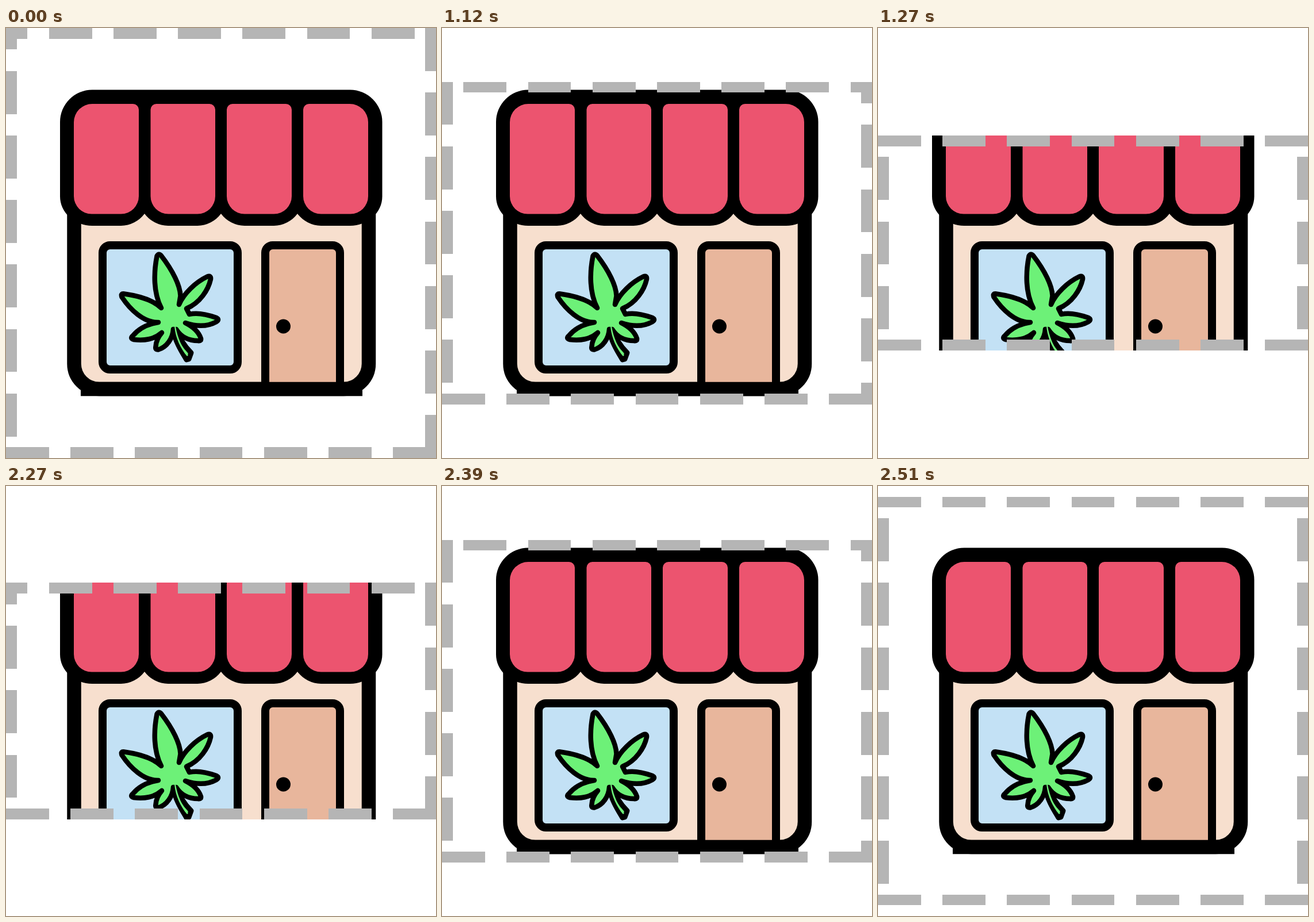
An HTML page that plays this animation: 748x748 px, repeating every 2540 ms.

```html
<!DOCTYPE html>
<html lang="en">
<head>
<meta charset="utf-8">
<title>Shop crop</title>
<style>
  html, body { margin: 0; width: 100%; height: 100%; overflow: hidden; background: #fff; }
  svg { display: block; width: 100vw; height: 100vh; }
</style>
</head>
<body>
<svg viewBox="0 0 748 748">
  <clipPath id="crop"><rect id="window" width="748" height="748"/></clipPath>
  <g clip-path="url(#crop)" stroke="#000">
    <rect x="118.5" y="200" width="512.5" height="428" rx="44" fill="#f7dfce" stroke-width="24.5"/>
    <rect x="168" y="378" width="235" height="216" rx="13" fill="#c3e1f5" stroke-width="14"/>
    <path d="M451 622V391a13 13 0 0 1 13-13H568a13 13 0 0 1 13 13V622" fill="#e8b69c" stroke-width="14"/>
    <path d="M130 628H620" stroke-width="24.5"/>
    <circle cx="482.5" cy="519" r="12.5" stroke="none"/>

    <g fill="#6df178" stroke-width="9" stroke-linejoin="round">
      <path d="M291 524C294 545 305 562 314 577L318 576L322 565C310 553 302 540 297 524Z"/>
      <path stroke-width="8.5" d="M270 487C256 460 257 425 262.500 397Q265.500 391 270 396
        C290 422 303 448 303.500 466L301 481
        C309 462 330 442 350 432.500Q357 430 356 437C352 455 338 478 314 488
        L319 498C335 494 352 499 366 504Q372 507 366 511C350 520 330 519 312 513
        C326 520 335 528 339 540Q340 545 334 544C318 544 304 537 296 524L291 524
        C290 540 280 555 265 559.500Q259 560 260.500 554C261 545 265 537 271 530
        C257 542 241 544 222 542Q215 540 221 535C231 523 246 515 265 512
        C240 513 216 490 201.500 468Q199 461 206 462.500C230 466 255 472 270 487Z"/>
      <path stroke="none" d="M293 519C295 540 304 558 315 571L317 569C306 555 299 541 295 519Z"/>
    </g>

    <path stroke="none" d="M94 163.500A56 56 0 0 1 150 107.500H598.500A56 56 0 0 1 654.500 163.500V293
      A56 51 0 0 1 598.500 344H548A52 52 0 0 1 507 323A52 52 0 0 1 466 344H415
      A52 52 0 0 1 374 323A52 52 0 0 1 333 344H282A52 52 0 0 1 241 323
      A52 52 0 0 1 200 344H150A56 51 0 0 1 94 293Z"/>
    <g id="awning" fill="#ec546f" stroke="none"></g>
  </g>
  <path id="dashes" fill="#b5b5b5"/>
</svg>
<script>
const CELLS = 40, UNIT = 748 / CELLS;
const DASH = 4, PERIOD = 6;
const LOOP = 2540, STEP = 30, CLOSE = 1000, OPEN = 2270, DEEPEST = 10;

const byId = id => document.getElementById(id);
const px = cell => Math.round(cell * UNIT);
const mod = (n, m) => ((n % m) + m) % m;

function panel(left, right, topLeft, topRight) {
  const top = 132, bottom = 323.5, r = 31;
  const arc = (radius, x, y) => `A${radius} ${radius} 0 0 1 ${x} ${y}`;
  return `<path d="M${left} ${top + topLeft}${arc(topLeft, left + topLeft, top)}` +
    `H${right - topRight}${arc(topRight, right, top + topRight)}` +
    `V${bottom - r}${arc(r, right - r, bottom)}H${left + r}${arc(r, left, bottom - r)}Z"/>`;
}

byId('awning').innerHTML = panel(118, 231, 32, 10) + panel(251.5, 364, 10, 10) +
  panel(384, 497, 10, 10) + panel(517, 630, 10, 32);

// Calls add(start, end) for each dash between two cells.
function eachDash(from, to, phase, add) {
  for (let c = from - mod(from - phase, PERIOD); c < to; c += PERIOD) {
    const a = Math.max(c, from), b = Math.min(c + DASH, to);
    if (a < b) add(a, b);
  }
}

function drawCrop(inset) {
  const end = CELLS - inset;
  let path = '';
  const box = (x0, y0, x1, y1) => {
    path += `M${px(x0)} ${px(y0)}H${px(x1)}V${px(y1)}H${px(x0)}Z`;
  };
  const row = (y, phase) => eachDash(0, CELLS, phase, (a, b) => box(a, y, b, y + 1));
  const column = (x, phase) => eachDash(inset, end, phase, (a, b) => box(x, a, x + 1, b));

  row(inset, 4 + 2 * inset);
  row(end - 1, 0);
  column(0, 4 - inset);
  column(CELLS - 1, 3 * inset);

  byId('dashes').setAttribute('d', path);
  byId('window').setAttribute('y', px(inset));
  byId('window').setAttribute('height', px(end) - px(inset));
}

function insetAt(t) {
  if (t < CLOSE) return 0;
  if (t < OPEN) return Math.min(DEEPEST, 1 + Math.floor((t - CLOSE) / STEP));
  return DEEPEST - 1 - Math.floor((t - OPEN) / STEP);
}

const start = performance.now();
let shown = -1;
function tick() {
  const inset = insetAt((performance.now() - start) % LOOP);
  if (inset !== shown) drawCrop(shown = inset);
  requestAnimationFrame(tick);
}
tick();
</script>
</body>
</html>
```
